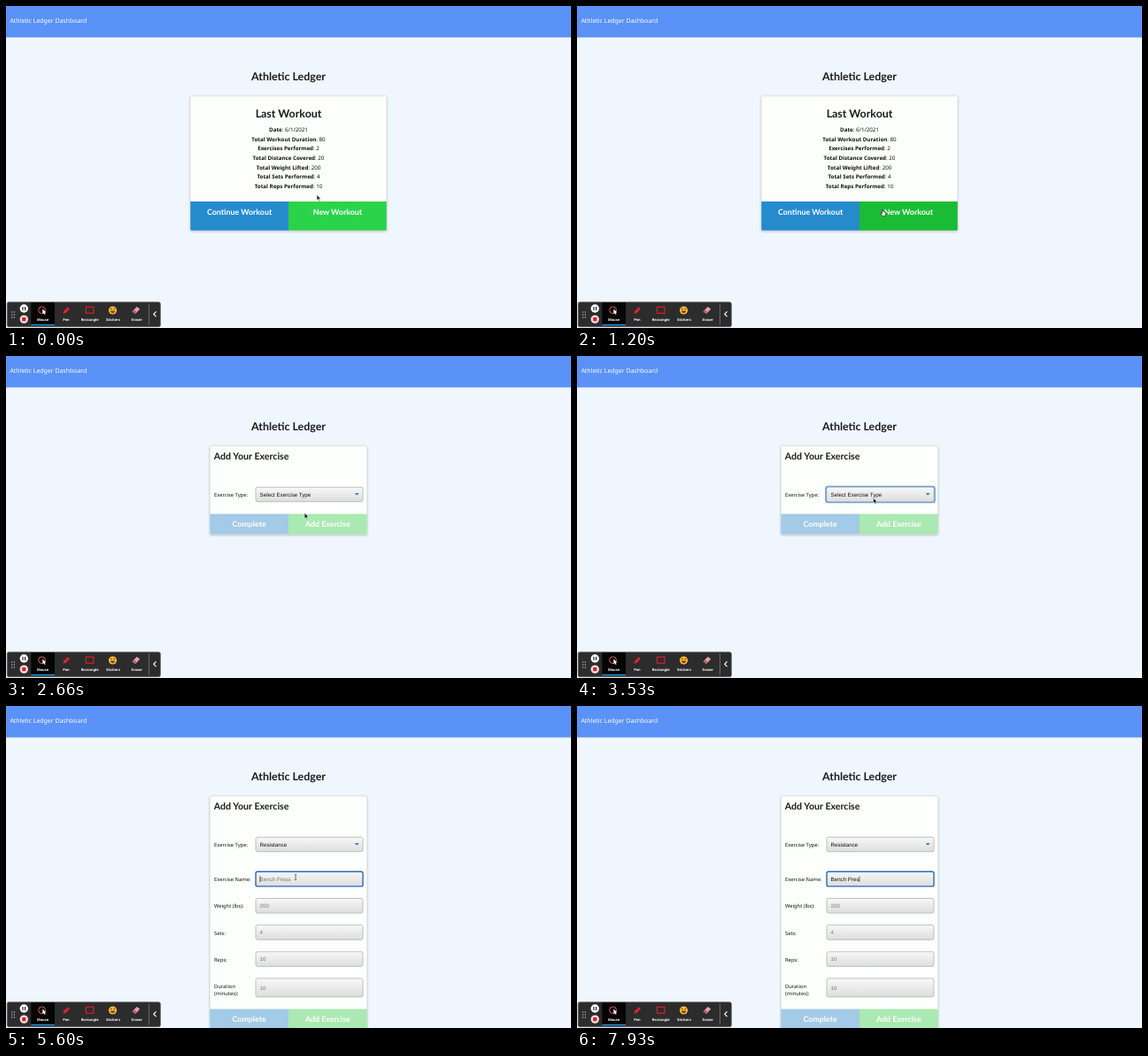
Write an HTML page that moves like this. It is 638 by 364 pixels and loops after 8000 ms.

```html
<!DOCTYPE html>
<html lang="en">
<head>
<meta charset="utf-8">
<title>Workout dashboard</title>
<style>
  html, body { margin: 0; width: 100%; height: 100%; overflow: hidden; background: #f0f6fd; }
  svg { display: block; width: 100vw; height: 100vh; }
  text { font-family: "Noto Sans", sans-serif; fill: #111; white-space: pre; text-rendering: geometricPrecision; }
  .head { font-family: Lato, sans-serif; font-weight: 700; fill: #1b1c1d; }
  .btn { font-family: Lato, sans-serif; font-weight: 700; font-size: 8.86px; fill: #fff; text-anchor: middle; }
  .field { font-family: "Liberation Sans", Arial, sans-serif; font-size: 6.2px; }
  .tool { font-size: 4px; font-weight: 700; fill: #fff; text-anchor: middle; }
  .mid { text-anchor: middle; }
</style>
</head>
<body>
<svg id="stage" viewBox="0 0 638 364">
  <defs>
    <linearGradient id="face" x2="0" y2="1">
      <stop offset="0" stop-color="#f8f8f8"/>
      <stop offset="1" stop-color="#dcdddc"/>
    </linearGradient>
    <filter id="shade" x="-10%" y="-10%" width="120%" height="120%">
      <feDropShadow dx="0" dy="0.8" stdDeviation="1" flood-color="#223" flood-opacity=".32"/>
    </filter>
  </defs>
  <rect width="638" height="364" fill="#f0f6fd"/>
  <rect width="638" height="35.5" fill="#5a92f7"/>
  <text x="4.4" y="18.5" font-size="6.95" style="fill:#fff">Athletic Ledger Dashboard</text>
  <text class="head mid" x="319" y="83.8" font-size="12.4">Athletic Ledger</text>
  <g id="summary"></g>
  <g id="form"></g>
  <g id="bar"></g>
  <g id="pointer">
    <path id="arrow" d="M0 0V6.2L1.5 4.9 2.5 7.2 3.5 6.8 2.5 4.5H4.4Z" fill="#111" stroke="#fff" stroke-width=".5"/>
    <path id="hand" d="M-.9 -2.6Q-.2 -3.5 .4 -2.6L.8 -.6Q3.1 -.6 3.5 .5L3.1 2.8 2.5 4.2H-.5L-2.4 1.6Q-2.7 .4 -1.6 .6L-.6 1.4Z" fill="#fff" stroke="#222" stroke-width=".75"/>
    <path id="beam" d="M-1.2 -3Q0 -3 0 -2.3Q0 -3 1.2 -3M0 -2.4V2.4M-1.2 3Q0 3 0 2.3Q0 3 1.2 3" fill="none" stroke="#333" stroke-width=".65"/>
  </g>
</svg>
<script>
const LOOP = 8000;
const $ = id => document.getElementById(id);
const show = (id, on) => $(id).setAttribute('display', on ? 'inline' : 'none');

const rect = (x, y, w, h, fill, extra = '') =>
  `<rect x="${x}" y="${y}" width="${w}" height="${h}" fill="${fill}" ${extra}/>`;
const text = (x, y, str, size, cls = '', extra = '') =>
  `<text x="${x}" y="${y}" font-size="${size}" class="${cls}" ${extra}>${str}</text>`;
const card = (x, y, w, h, id = '') =>
  rect(x, y, w, h, '#fdfffc', `rx="1.6" stroke="#d4d6d8" stroke-width=".5" filter="url(#shade)" ${id}`);
const box = (y, h, id = '') =>
  rect(282, y, 121, h, 'url(#face)', `rx="2" stroke="#b9bbbb" stroke-width=".9" ${id}`);

// Two buttons side by side with rounded outer bottom corners
function buttons(x, y, w, h, left, right, [a, b], baseline, id = '') {
  const half = w / 2;
  return `<path d="M${x} ${y}h${half}v${h}h${1.6 - half}q-1.6 0 -1.6 -1.6Z" fill="${a}"/>` +
    `<path ${id} d="M${x + half} ${y}h${half}v${h - 1.6}q0 1.6 -1.6 1.6h${1.6 - half}Z" fill="${b}"/>` +
    text(x + half / 2, y + baseline, left, 8.86, 'btn') +
    text(x + half * 1.5, y + baseline, right, 8.86, 'btn');
}

const stats = [
  ['Date', '6/1/2021'], ['Total Workout Duration', 80], ['Exercises Performed', 2],
  ['Total Distance Covered', 20], ['Total Weight Lifted', 200],
  ['Total Sets Performed', 4], ['Total Reps Performed', 10]
];
$('summary').innerHTML = card(208.2, 101.8, 221.6, 152) +
  text(319, 126, 'Last Workout', 12.4, 'head mid') +
  stats.map(([name, value], i) => text(319, 142 + i * 10.64,
    `<tspan font-weight="700">${name}</tspan>: ${value}`, 6.2, 'mid')).join('') +
  buttons(208.2, 221, 221.6, 32.8, 'Continue Workout', 'New Workout', ['#268bcd', '#2bd34b'], 15, 'id="fresh"');

const inputs = [
  ['Exercise Name:', 187.3, 16.6, 'Bench Press'], ['Weight (lbs):', 217.5, 16.6, '200'],
  ['Sets:', 247.6, 16.6, '4'], ['Reps:', 277.8, 16.6, '10'], ['', 307.9, 21, '10']
];
const row = ([label, y, h, hint], i) => {
  const mid = y + h / 2;
  return text(235, mid + 2.6, label, 5.8) + box(y, h, i ? '' : 'id="name"') +
    text(286.6, mid + 2.2, hint, 6.2, 'field', `style="fill:#777" ${i ? '' : 'id="typed"'}`);
};
const pale = ['#a3cae6', '#aae9b1'];
$('form').innerHTML = card(230.3, 101.8, 177.4, 99.6, 'id="panel"') +
  text(234.8, 116.9, 'Add Your Exercise', 10.63, 'head') +
  text(235, 159.2, 'Exercise Type:', 5.8) +
  rect(281.2, 147.7, 122.6, 17.6, 'none', 'id="ring" rx="2.6" stroke="#5d9bd8" stroke-width="2"') +
  box(148.3, 16.4) + text(286.6, 158.8, '', 6.2, 'field', 'id="choice"') +
  '<path d="M393.7 154.9h5l-2.5 2.7Z" fill="#2a7cc0"/>' +
  '<g id="fields">' + inputs.map(row).join('') +
  text(235, 318.6, 'Duration', 5.8) + text(235, 326.8, '(minutes):', 5.8) +
  '<path id="caret" d="M0 192.3v6.6" stroke="#111" stroke-width=".6"/></g>' +
  '<g id="actions">' + buttons(230.3, 178.4, 177.4, 23, 'Complete', 'Add Exercise', pale, 14.8) + '</g>';

const dots = [6.7, 9.4].map(x => [346, 349, 352].map(y =>
  `<circle cx="${x}" cy="${y}" r=".75" fill="#bbb"/>`).join('')).join('');
const tools = [['Mouse', 41.5], ['Pen', 68], ['Rectangle', 94.7], ['Stickers', 121], ['Eraser', 147.7]];
$('bar').innerHTML =
  rect(1.2, 334.7, 173.2, 28, '#2c2c2d', 'rx="2" stroke="#666" stroke-width=".7"') + dots +
  rect(28.3, 335.2, 26.7, 26, '#050505') + rect(28.3, 359.8, 26.7, 1.4, '#1b96e8') +
  '<circle cx="20.3" cy="342" r="4.7" fill="#fff"/><path d="M19 339.9v4.2M21.6 339.9v4.2" stroke="#222" stroke-width="1.2"/>' +
  '<circle cx="20.3" cy="354.1" r="4.7" fill="#f5dedf"/>' + rect(18.2, 352, 4.2, 4.2, '#d5202c', 'rx=".5"') +
  '<circle cx="40.6" cy="343.8" r="3.9" fill="none" stroke="#e05a62" stroke-width="1"/>' +
  '<path d="M41.3 342.6v5.6l1.4-1.2 1 2 .9-.5-1-1.9h1.8Z" fill="#fff"/>' +
  '<path d="M64.4 347.8l.8-3 4.6-4.5 2.2 2.2-4.6 4.5Z" fill="#df2530"/><path d="M67.8 341.8l2.5 2.5" stroke="#8d151d" stroke-width=".6"/>' +
  rect(90.4, 340.3, 8.5, 7, 'none', 'stroke="#d71e2a" stroke-width="1.2"') +
  '<circle cx="120.5" cy="344" r="4.6" fill="#f6bb35"/><path d="M117.8 342.4h1.7M121.5 342.4h1.7" stroke="#593714" stroke-width="1"/>' +
  '<path d="M117.7 344.6h5.6q-.5 2.6-2.8 2.6t-2.8-2.6Z" fill="#853a20"/>' +
  '<path d="M142.5 345.5l5.1-5.4 3.6 2.4-5 5.4Z" fill="#e5a3a8"/><path d="M142.5 345.5l1.9-2 3.6 2.4-1.8 2Z" fill="#b95c66"/>' +
  tools.map(([name, x]) => text(x, 355.5, name, 4, 'tool')).join('') +
  '<path d="M161.4 336.5v24" stroke="#888" stroke-width=".7"/>' +
  '<path d="M169.5 345.4l-2.7 2.9 2.7 2.9" fill="none" stroke="#fff" stroke-width="1.2"/>';

// Pointer stops: time, x, y
const stops = [
  [260, 351, 213.4], [900, 345.3, 233.2], [2250, 345.3, 233.2], [2850, 334.6, 160.4],
  [4200, 334.6, 160.4], [4560, 327, 193.6], [LOOP, 327, 193.6]
];
const keys = [6000, 6200, 6400, 6600, 6830, 7050, 7290, 7480, 7660, 7850];
const PAGE = 1600, FOCUS = 3000, PICK = 4230, EDIT = 5350;

function pointerAt(t) {
  if (t <= stops[0][0]) return stops[0].slice(1);
  const i = stops.findIndex(s => s[0] > t);
  const [t0, x0, y0] = stops[i - 1], [t1, x1, y1] = stops[i];
  const p = (t - t0) / (t1 - t0), k = p * p * (3 - 2 * p);
  return [x0 + (x1 - x0) * k, y0 + (y1 - y0) * k];
}

function draw(t) {
  const [x, y] = pointerAt(t);
  const formOn = t >= PAGE, open = t >= PICK, editing = t >= EDIT;
  show('summary', !formOn);
  show('form', formOn);

  const hover = Math.min(1, Math.max(0, (y - 220.5) / 4));
  const mix = (a, b) => Math.round(a + (b - a) * hover);
  $('fresh').setAttribute('fill', `rgb(${mix(43, 27)},${mix(211, 188)},${mix(75, 53)})`);

  show('fields', open);
  show('ring', t >= FOCUS && !editing);
  $('choice').textContent = open ? 'Resistance' : 'Select Exercise Type';
  $('panel').setAttribute('height', open ? 263.8 : 99.6);
  $('actions').setAttribute('transform', `translate(0 ${open ? 164.1 : 0})`);

  const count = keys.filter(k => k <= t).length;
  const typed = $('typed');
  typed.textContent = 'Bench Press'.slice(0, count || 11);
  typed.style.fill = count ? '#111' : '#777';
  $('name').setAttribute('stroke', editing ? '#2868b8' : '#b9bbbb');
  $('name').setAttribute('stroke-width', editing ? 1.4 : .9);
  const width = count && open ? typed.getComputedTextLength() : 0;
  $('caret').setAttribute('transform', `translate(${286.9 + width} 0)`);
  show('caret', editing && (count > 0 || (t - EDIT) % 1000 < 500));

  const hand = hover > 0 && t < 2300;
  const beam = t > 4300 && y > 187;
  show('pointer', !count);
  show('hand', hand);
  show('beam', beam);
  show('arrow', !hand && !beam);
  $('pointer').setAttribute('transform', `translate(${x} ${y})`);
}

const start = performance.now();
function tick() {
  draw((performance.now() - start) % LOOP);
  requestAnimationFrame(tick);
}
tick();
</script>
</body>
</html>
```
